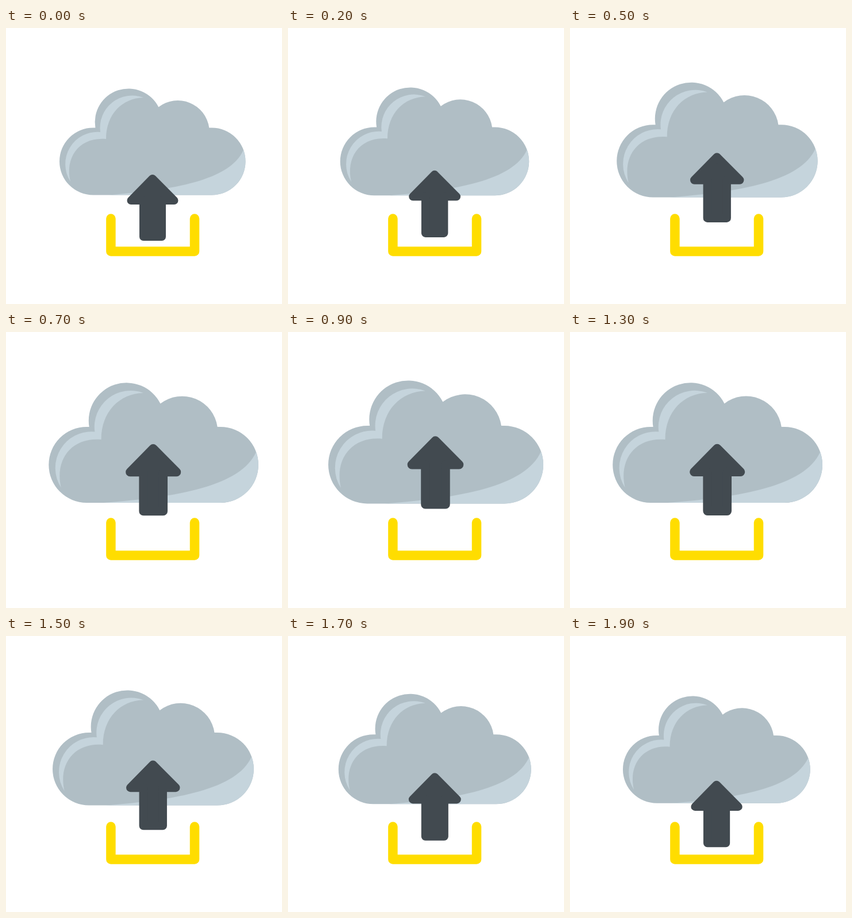
These frames come from a looping animation (480 px wide and 480 px high, 2000 ms). An HTML page:

```html
<!DOCTYPE html>
<html lang="en">
<head>
<meta charset="utf-8">
<title>Cloud upload</title>
<style>
  html, body { margin: 0; width: 100%; height: 100%; overflow: hidden; background: #fff; }
  svg { display: block; width: 100%; height: 100%; }
</style>
</head>
<body>
<svg viewBox="0 0 480 480">
  <g id="cloud">
    <path fill="#b0bec5" d="M151.5 290.5A58.5 58.5 0 0 1 151.5 173.5H155.4A58.5 58.5 0 0 1 265.3 137.5A55 55 0 0 1 353.3 173.5H358A58.5 58.5 0 0 1 358 290.5Z"/>
    <g fill="#c5d4dc">
      <path d="M164 181A56 56 0 0 1 239 121C202 122 174 150 174 193C128 189 102 224 112 267A56 56 0 0 1 164 181Z"/>
      <path d="M413 212C390 265 290 282 178 290.5H358A58.5 58.5 0 0 0 413 212Z"/>
    </g>
  </g>
  <path fill="none" stroke="#ffdd00" stroke-width="16.5" stroke-linecap="round" stroke-linejoin="round" d="M182.4 331.5V388.5H328V331.5"/>
  <path id="arrow" fill="#424a50" stroke="#424a50" stroke-width="14" stroke-linejoin="round" d="M254.8 262L292.5 300H271V363H239V300H217.5Z"/>
</svg>
<script>
  const LOOP = 2000, STEP = 100, CENTER = 240;
  const cloud = document.getElementById("cloud");
  const arrow = document.getElementById("arrow");

  // Sine ease up and back; the fall stops just short of the start pose.
  function liftAt(time) {
    const wave = (1 - Math.cos(2 * Math.PI * time / LOOP)) / 2;
    return time < LOOP / 2 ? wave : 0.02 + 0.98 * wave;
  }

  function place(shape, scale, rise) {
    shape.setAttribute("transform",
      `translate(${CENTER} ${CENTER - rise}) scale(${scale}) translate(${-CENTER} ${-CENTER})`);
  }

  function draw() {
    const time = Math.floor(performance.now() % LOOP / STEP) * STEP;
    const lift = liftAt(time);
    place(cloud, 1 + 0.16 * lift, 0);
    place(arrow, 1 + 0.1 * lift, 77 * lift);
    requestAnimationFrame(draw);
  }
  draw();
</script>
</body>
</html>
```
